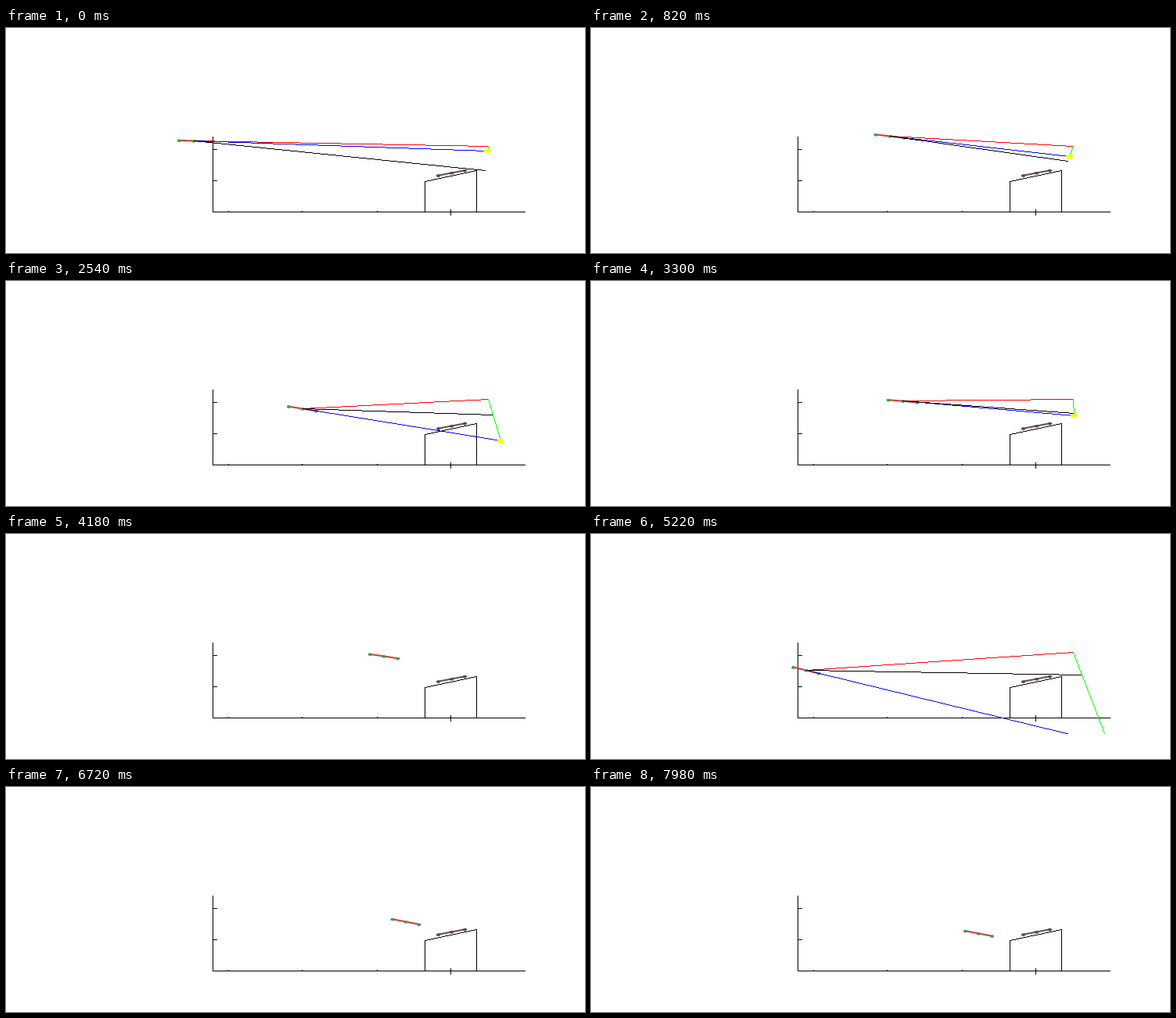
A matplotlib script that plays this animation: 740x288 px, repeating every 8000 ms.

```python
import numpy as np
import matplotlib.pyplot as plt
from matplotlib.animation import FuncAnimation
from matplotlib.patches import Ellipse, PathPatch, Rectangle
from matplotlib.path import Path

W, H, DPI = 740, 288, 100
STEP, FRAMES = 20, 400
UNIT = np.array([95.3, 40.0])     # pixels per axis unit
AIM = np.array([616.0, 151.0])
GLIDE = 0.2                       # fixed angle below the line of sight
HALF = 19.6                       # half length of the craft
NEAR = 445                        # guide lines vanish past this x
PERCH = (569.5, 185.5, -.425)     # x, y, pitch at rest

# Each flight: a few key poses as time in ms, x, y, pitch
FLIGHTS = [np.array(keys, float) for keys in (
    [(0, 240, 144.5, .08), (820, 382, 138.5, .267), (1700, 660, 190, .1)],
    [(1720, 303, 172, .45), (2540, 379, 163.5, .37), (3290, 398, 154, .2),
     (3750, 437, 140, .26), (4180, 483, 156.5, .343), (4640, *PERCH)],
    [(4720, 222, 178, .45), (5220, 275, 174.5, .525), (5740, 397, 140.5, .32),
     (6720, 511, 172.5, .444), (7420, *PERCH)],
    [(7700, 495.5, 187.5, .425)],
)]


def pose(t):
    """Smooth x, y, pitch at time t on the flight in progress."""
    keys = [f for f in FLIGHTS if f[0, 0] <= t][-1]
    ts, p = keys[:, 0], keys[:, 1:]
    if t >= ts[-1]:
        return p[-1]
    v = np.gradient(p, ts, axis=0, edge_order=2)
    i = np.searchsorted(ts, t, side="right") - 1
    d = ts[i + 1] - ts[i]
    s = (t - ts[i]) / d
    return ((1 + 2 * s) * (1 - s) ** 2 * p[i] + s * (1 - s) ** 2 * d * v[i]
            + s * s * (3 - 2 * s) * p[i + 1] + s * s * (s - 1) * d * v[i + 1])


fig = plt.figure(figsize=(W / DPI, H / DPI), dpi=DPI, facecolor="white")
ax = fig.add_axes([0, 0, 1, 1])
ax.set_xlim(0, W)
ax.set_ylim(H, 0)
ax.axis("off")
frame_box = Rectangle((80, 20), 584, 236, transform=ax.transData)

SQUARE = np.array([(0, 0), (1, 0), (1, 1), (0, 1), (0, 0)])
SQUARE_CODES = [Path.MOVETO] + [Path.LINETO] * 3 + [Path.CLOSEPOLY]


def pixel_path(a, b):
    """Hard-edged line from a to b, one pixel wide."""
    a, b = np.floor(a), np.floor(b)
    n = int(np.abs(b - a).max()) + 1
    cells = np.floor(np.linspace(a, b, n) + 0.5)
    verts = (cells[:, None] + SQUARE).reshape(-1, 2)
    return Path(verts, SQUARE_CODES * n)


def add(patch):
    ax.add_patch(patch)
    patch.set_clip_path(frame_box)
    return patch


def line(a, b, color="black", z=1):
    return add(PathPatch(pixel_path(a, b), fc=color, ec="none", lw=0,
                         snap=False, zorder=z))


class Craft:
    def __init__(self, bar_color, dot_color, z):
        self.bar, = ax.plot([], [], color=bar_color, lw=2.1 * 72 / DPI, zorder=z)
        self.bar.set_clip_path(frame_box)
        self.dots = [add(Ellipse((0, 0), 5.4, 3.6, fc=dot_color, ec="none",
                                 zorder=z + .1)) for _ in range(3)]

    def place(self, c, pitch):
        arm = HALF * np.array([np.cos(pitch), np.sin(pitch) * UNIT[1] / UNIT[0]])
        self.bar.set_data(*np.transpose([c - arm, c + arm]))
        for k, d in zip((-.95, 0, .95), self.dots):
            d.center = c + k * arm + (0, .4)


# Axes and landing block
line((264, 139), (264, 235))
line((264, 235), (663, 235))
for y in (155, 195):
    line((264, y), (269, y))
for x in (284, 378, 474):
    line((x, 234), (x, 235))
line((568, 232), (568, 239))
block = [(535, 235), (535, 196), (601, 182), (601, 235)]
for a, b in zip(block, block[1:]):
    line(a, b)
Craft("#6b5254", "#5c4a4a", 2).place(np.array(PERCH[:2]), PERCH[2])

craft = Craft("#d83c3c", "#4a9a4a", 3)
sight, nose, glide, gap = guides = [
    line(AIM, AIM, c, 4 + i / 10)
    for i, c in enumerate(("red", "blue", "black", "lime"))]
mark = add(Ellipse((0, 0), 9.5, 5.4, fc="yellow", ec="none", zorder=5))


def draw(n):
    x, y, pitch = pose(n * STEP)
    c = np.array([x, y])
    craft.place(c, pitch)
    for g in (*guides, mark):
        g.set_visible(x < NEAR)
    if x < NEAR:
        ray = (AIM - c) / UNIT
        normal = np.array([-ray[1], ray[0]]) * UNIT
        hit = AIM + np.tan(pitch - np.arctan2(ray[1], ray[0])) * normal
        low = AIM + np.tan(GLIDE) * normal
        sight.set_path(pixel_path(c, AIM))
        nose.set_path(pixel_path(c, hit))
        glide.set_path(pixel_path(c, low))
        gap.set_path(pixel_path(AIM, hit))
        mark.center = hit
    return [craft.bar, *craft.dots, *guides, mark]


anim = FuncAnimation(fig, draw, frames=FRAMES, interval=STEP, repeat=True,
                     repeat_delay=0, init_func=lambda: draw(0))
plt.show()
```
